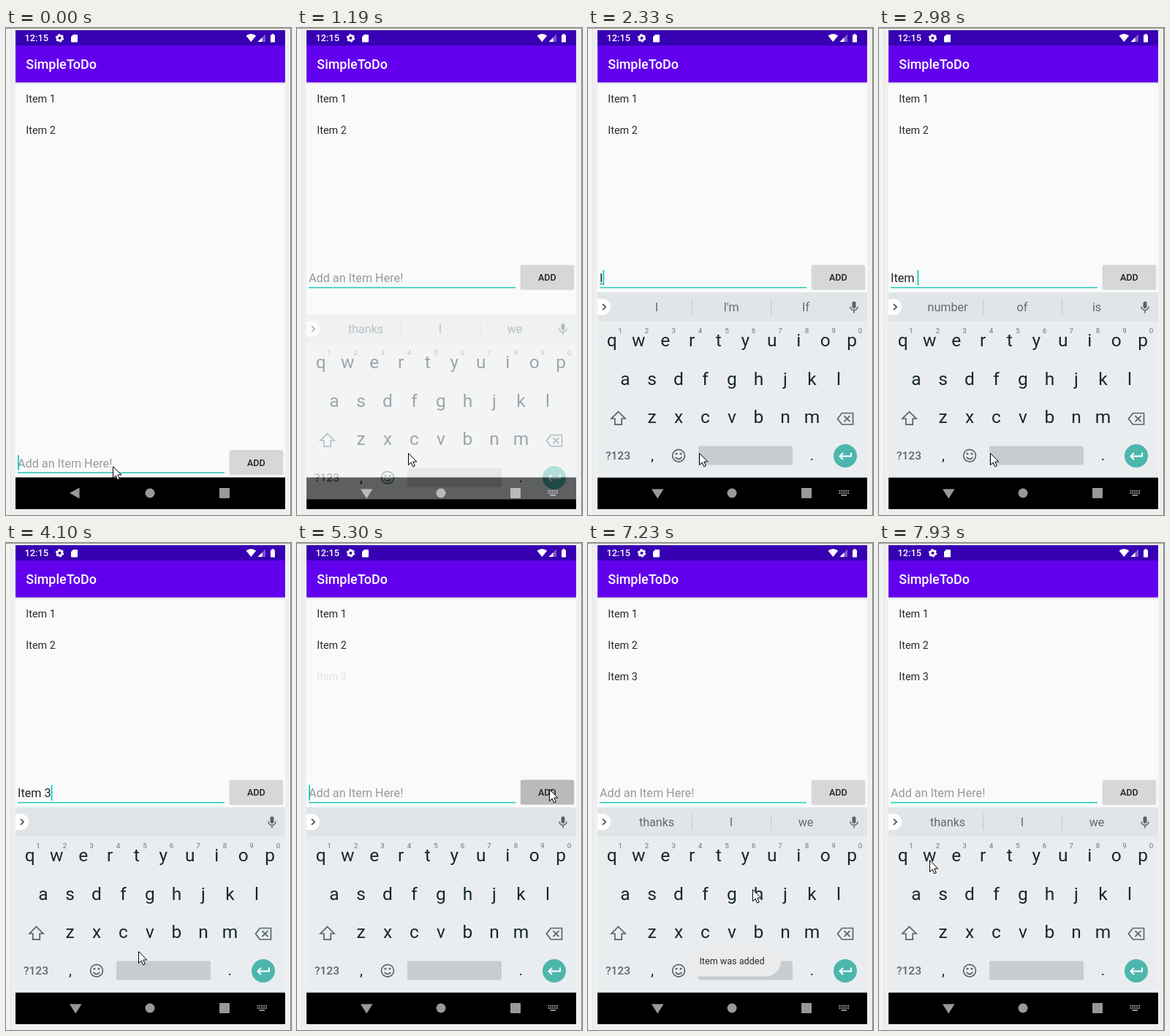
Write an HTML page that moves like this. It is 390 px wide and 667 px high and loops after 8000 ms.

```html
<!DOCTYPE html>
<html lang="en">
<head>
<meta charset="utf-8">
<title>To-do list</title>
<style>
  html, body { margin: 0; width: 100%; height: 100%; overflow: hidden; background: #efefef; }
  svg { display: block; width: 390px; height: 667px; font-family: Roboto, sans-serif; }
  text { white-space: pre; }
  .mid { text-anchor: middle; }
  .med { font-weight: 500; }
  .line { fill: none; stroke: #55636b; stroke-width: 1.7; }
</style>
</head>
<body>
<svg viewBox="0 0 390 667">
  <defs>
    <linearGradient id="drop" x2="0" y2="1">
      <stop stop-color="#000" stop-opacity=".12"/>
      <stop offset="1" stop-color="#000" stop-opacity="0"/>
    </linearGradient>
  </defs>

  <!-- window around the phone -->
  <rect width="390" height="667" fill="#efefef"/>
  <rect width="6" height="667" fill="#f3f3f4"/>
  <rect x="6" width="1" height="667" fill="#e4e4e4"/>
  <rect width="390" height="1" fill="#9c9c9c"/>
  <rect x="389" width="1" height="667" fill="#858585"/>

  <!-- app -->
  <rect x="13" y="3" width="369" height="656" fill="#fafafa"/>
  <rect x="13" y="74" width="369" height="4" fill="url(#drop)"/>
  <rect x="13" y="24" width="369" height="50.5" fill="#6200ee"/>
  <rect x="13" y="3" width="369" height="21" fill="#3700b3"/>
  <g fill="#fff">
    <text class="med" x="25.5" y="18.3" font-size="12.8">12:15</text>
    <circle cx="73.5" cy="13.8" r="3.4" fill="none" stroke="#fff" stroke-width="2.8"/>
    <circle cx="73.5" cy="13.8" r="4.9" fill="none" stroke="#fff" stroke-width="1.6" stroke-dasharray="2.56 2.56"/>
    <path d="M92 9h5q1 0 1 1v8.5q0 1-1 1h-7q-1 0-1-1V12z"/>
    <path d="M328.5 10.5Q335.3 5.5 342.2 10.5L335.3 19z"/>
    <path d="M355 8.5V19H344.5z" opacity=".35"/>
    <path d="M350.5 13V19H344.5z"/>
    <path d="M362 9.5h1.7V8h2.6v1.5H368V19.5h-6z"/>
    <text class="med" x="27.3" y="56" font-size="17.95">SimpleToDo</text>
  </g>
  <g id="items" fill="#2a2a2a" font-size="14.36"></g>

  <!-- entry row, placed for the open keyboard -->
  <g id="row">
    <text id="hint" x="16" y="348" font-size="16.2" fill="#999">Add an Item Here!</text>
    <text id="typed" x="16" y="348" font-size="16.2" fill="#222"></text>
    <rect id="under" x="16" y="350" height="1" fill="#444"/>
    <rect x="16" y="354.8" width="283" height="1.5" fill="#1fc9b5"/>
    <rect id="caret" y="331.5" width="1.8" height="21" fill="#12cdb9"/>
    <rect x="305.5" y="325.5" width="74" height="33.5" rx="2" opacity=".1"/>
    <rect x="306" y="324.5" width="73" height="33.5" rx="2" fill="#d6d7d7"/>
    <rect id="press" x="306" y="324.5" width="73" height="33.5" rx="2" fill="#b9bbba"/>
    <text class="mid med" x="342.4" y="346" font-size="12.6" fill="#222">ADD</text>
  </g>

  <!-- navigation bar -->
  <rect x="13" y="615.5" width="369" height="43.5" fill="#000"/>
  <g fill="#999">
    <path id="back" d="M87 637L100.5 629.5V644.5z"/>
    <path id="down" d="M87 631.5H103.5L95.2 644.5z"/>
    <circle cx="197" cy="637" r="6.5"/>
    <rect x="292" y="630" width="14" height="14" rx="1"/>
    <g id="ime"></g>
  </g>

  <!-- keyboard -->
  <g id="kb">
    <rect x="13" y="362" width="369" height="253.5" fill="#e9edf0"/>
    <rect x="13" y="362" width="369" height="40" fill="#e1e5e8"/>
    <path d="M13 371h7a11 11 0 0 1 0 22h-7z" fill="#fff"/>
    <path class="line" d="M20 378l4 4-4 4" style="stroke:#444"/>
    <g id="words" fill="#5f6b72" font-size="16.1">
      <path id="bars" d="M142.5 371v22M250.5 371v22" stroke="#c3c8cb"/>
    </g>
    <rect x="361.5" y="374.5" width="5" height="9.5" rx="2.5" fill="#55636b"/>
    <path class="line" d="M359 381.5a5 5 0 0 0 10 0M364 386.5v4" style="stroke-width:1.5"/>
    <g id="keys" fill="#17272f"></g>
    <path class="line" d="M41.5 525.5L51 535h-4.8v8.2h-9.4V535H32z"/>
    <path class="line" d="M347.5 527.5H362.5V543H347.5L341.5 535.2zM350.5 531.2l8 8M358.5 531.2l-8 8"/>
    <text class="med" x="24" y="591" font-size="15.5" fill="#5b676d">?123</text>
    <g class="line">
      <circle cx="124" cy="585.7" r="8.4"/>
      <path d="M119.5 587.7q4.5 5.5 9 0"/>
    </g>
    <circle cx="121" cy="583.2" r="1.4" fill="#55636b"/>
    <circle cx="127" cy="583.2" r="1.4" fill="#55636b"/>
    <rect x="151" y="572.5" width="129" height="26" rx="2.5" fill="#c8ccce"/>
    <circle cx="352" cy="586" r="16" fill="#4db6ac"/>
    <path class="line" d="M360 581.5V586.5H345M349 582l-4.5 4.5 4.5 4.5" style="stroke:#fff;stroke-width:2"/>
  </g>

  <g id="toast">
    <rect x="133" y="553" width="131" height="42" rx="21" opacity=".05"/>
    <rect x="133" y="552" width="131" height="42" rx="21" fill="#eaebec"/>
    <text class="mid" x="197" y="577" font-size="12.6" fill="#2b2b2b">Item was added</text>
  </g>

  <path id="mouse" d="M.5 .5V16.5L4.2 13 6.7 18.8 9.3 17.7 6.8 12H11.8z" fill="#fff" stroke="#000"/>
</svg>

<script>
const NS = 'http://www.w3.org/2000/svg';
const LOOP = 8000;
const TAP = 1270;     // entry field gets the focus
const RISE = 1190;    // keyboard starts to slide in
const SLIDE = 300;
const SUBMIT = 5300;
const $ = id => document.getElementById(id);

function add(parent, tag, attrs, text = '') {
  const el = document.createElementNS(NS, tag);
  for (const k in attrs) el.setAttribute(k, attrs[k]);
  el.textContent = text;
  return $(parent).appendChild(el);
}

const items = [1, 2, 3].map(n =>
  add('items', 'text', { x: 27.3, y: 58.9 + n * 43.08 }, 'Item ' + n));

// key caps: rows of equal pitch, each centred on the keyboard
const PITCH = 36.5;
['qwertyuiop', 'asdfghjkl', 'zxcvbnm'].forEach((row, r) =>
  [...row].forEach((c, i) => add('keys', 'text', {
    class: 'mid', x: 197 + (i - (row.length - 1) / 2) * PITCH, y: 436 + r * 52.6, 'font-size': 24.5
  }, c)));
[...'1234567890'].forEach((c, i) => add('keys', 'text', {
  class: 'mid', x: 44 + i * PITCH, y: 418, 'font-size': 9.8, fill: '#69747a'
}, c));
[',', '.'].forEach((c, i) =>
  add('keys', 'text', { class: 'mid', x: 88 + i * 218.5, y: 591.5, 'font-size': 20 }, c));

// keyboard switch icon: two rows of dots and a bar
for (let i = 0; i < 10; i++)
  add('ime', 'rect', { x: 343.5 + i % 5 * 2.9, y: 633 + (i > 4) * 3, width: 1.9, height: 1.9 });
add('ime', 'rect', { x: 346.5, y: 639, width: 7.6, height: 1.8 });

const words = [94, 196, 298].map(x => add('words', 'text', { class: 'mid', x, y: 388 }));

// time, text in the field, suggestions
const edits = [
  [-250, '', 'thanks|I|we'],
  [2330, 'I', "I|I'm|If"],
  [2550, 'It', "It|It's|Its"],
  [2760, 'Item', 'Items|Item|Itemized'],
  [2980, 'Item ', 'number|of|is'],
  [3820, 'Item 3', ''],
  [SUBMIT, '', 'thanks|I|we']
];

// time, x, y of the pointer's stops
const stops = [
  [400, 146, 600], [760, 152, 582], [4099, 152, 582], [4100, 181, 559], [5030, 345, 337],
  [5430, 345, 337], [5960, 289, 398], [6510, 289, 398], [7090, 236, 477], [7930, 69, 434]
];

const ramp = (t, a, b) => Math.min(1, Math.max(0, (t - a) / (b - a)));
const smooth = p => p * p * (3 - 2 * p);
const set = (id, name, value) => $(id).setAttribute(name, value);
const show = (id, value) => set(id, 'opacity', +value);

// the screen is sampled in coarse steps
const snap = (t, from, step) => from + Math.floor((t - from) / step) * step;

function pointer(t) {
  const i = stops.findLastIndex(s => s[0] <= t);
  if (i < 0) return stops[0].slice(1);
  const [a, x, y] = stops[i];
  const [b, u, v] = stops[i + 1] || stops[i];
  const p = b > a ? smooth(ramp(snap(t, a, 132), a, b)) : 0;
  return [x + (u - x) * p, y + (v - y) * p];
}

function draw(t) {
  const [time, text, hints] = edits.findLast(e => e[0] <= t);
  const left = 1 - ramp(snap(t, RISE, SLIDE / 2), RISE, RISE + SLIDE);
  const sliding = t >= RISE && left > 0;

  set('row', 'transform', `translate(0 ${t < RISE ? 253.5 : 0})`);
  set('kb', 'transform', `translate(0 ${30 * left ** 1.26})`);
  show('kb', t < RISE ? 0 : 1 - .6 * left ** 1.6);
  show('back', t < 1040);
  show('down', t >= 1040);
  show('ime', t >= 1040);

  $('typed').textContent = text;
  show('hint', !text);
  const width = text ? $('typed').getComputedTextLength() : 0;
  set('under', 'width', /^\w+$/.test(text) ? width : 0);

  // half a second on, half a second off since the last input
  const since = t - (t >= TAP ? Math.max(time, TAP) : time);
  set('caret', 'x', 16 + width);
  show('caret', !sliding && since % 1000 < 500);

  const list = (!text && t - time < 260 ? '' : hints).split('|');
  words.forEach((w, i) => w.textContent = list[i] || '');
  show('bars', list.length > 1);

  show('press', t < SUBMIT ? 0 : 1 - ramp(t, SUBMIT + 60, SUBMIT + 260));
  items[2].setAttribute('opacity', t < SUBMIT ? 0 : ramp(t, SUBMIT - 40, SUBMIT + 360));
  show('toast', ramp(t, 5400, 5700) - ramp(t, 7300, 7640));
  set('mouse', 'transform', `translate(${pointer(t)})`);
}

const start = performance.now();
function tick() {
  draw((performance.now() - start) % LOOP);
  requestAnimationFrame(tick);
}
tick();
</script>
</body>
</html>
```
